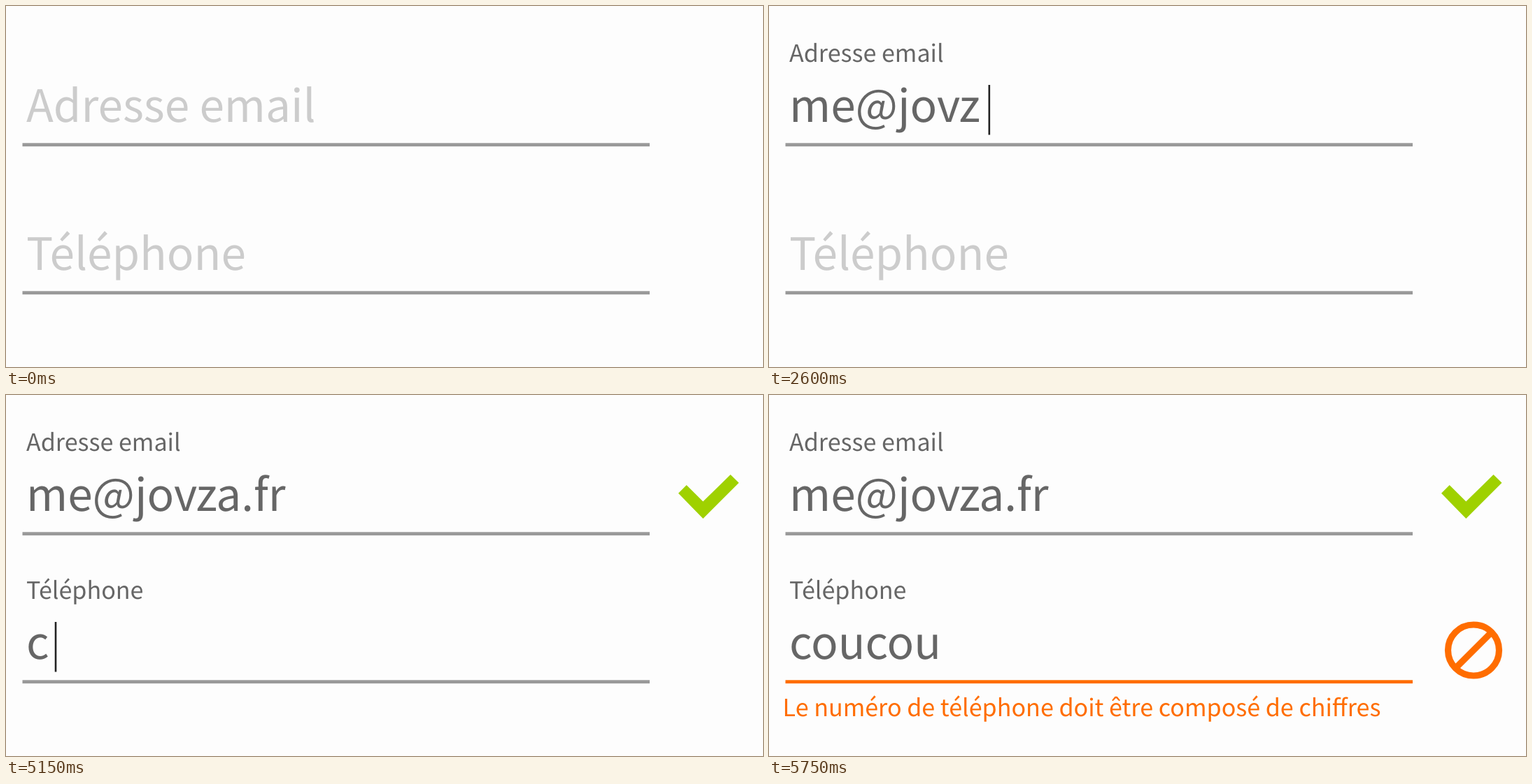
These frames come from a looping animation (1082x517 px, 8.5 s). An HTML page:

```html
<!DOCTYPE html>
<html lang="fr">
<head>
<meta charset="utf-8">
<title>Validation de formulaire</title>
<style>
  html, body { margin: 0; width: 100%; height: 100%; overflow: hidden; background: #fdfdfd; }
  svg { display: block; width: 1082px; height: 517px; }
  text {
    font-family: "Noto Sans CJK JP", "Noto Sans CJK SC", "Noto Sans CJK", "Open Sans", sans-serif;
    font-kerning: normal;
    text-rendering: geometricPrecision;
    fill: #666;
  }
  .large { font-size: 63.9px; }
  .small { font-size: 34.1px; }
  .placeholder { fill: #ccc; }
</style>
</head>
<body>
<svg id="stage" viewBox="0 0 1082 517"></svg>
<script>
const LOOP = 8500, KEY_DELAY = 150;
const GREY = '#999', ORANGE = '#ff6d00', GREEN = '#9fd100';
const stage = document.getElementById('stage');

function add(parent, tag, attrs, content = '') {
  const node = document.createElementNS('http://www.w3.org/2000/svg', tag);
  for (const name in attrs) node.setAttribute(name, attrs[name]);
  node.textContent = content;
  parent.appendChild(node);
  return node;
}

function show(node, visible) {
  node.setAttribute('visibility', visible ? 'visible' : 'hidden');
}

// keys: number of typed characters and caret position after each key press
function createField({ y, label, value, start, keys }) {
  const g = add(stage, 'g', { transform: `translate(0 ${y})` });
  const placeholder = add(g, 'text', { x: 29, y: 166.3, class: 'large placeholder' }, label);
  const caption = add(g, 'text', { x: 29, y: 80.3, class: 'small' }, label);
  const typed = add(g, 'text', { x: 29, y: 166.3, class: 'large' });
  const caret = add(g, 'rect', { y: 113, width: 2.6, height: 71.5, fill: '#222' });
  const line = add(g, 'rect', { x: 23.5, y: 196.3, width: 896.5, height: 4.8, fill: GREY });
  const end = start + keys.length * KEY_DELAY;

  return {
    line, end,
    update(t) {
      const active = t >= start;
      const key = t < end ? keys[Math.floor((t - start) / KEY_DELAY)] : null;
      show(placeholder, !active);
      show(caption, active);
      show(caret, active && key);
      typed.textContent = active ? value.slice(0, key ? key[0] : value.length) : '';
      if (key) caret.setAttribute('x', key[1] - 1.3);
    }
  };
}

const email = createField({
  y: 0, label: 'Adresse email', value: 'me@jovza.fr', start: 2000,
  keys: [[1, 97.2], [3, 194.3], [4, 211.3], [6, 283.3], [7, 314.8], [9, 368.3], [10, 390.3]]
});
const phone = createField({
  y: 212, label: 'Téléphone', value: 'coucou', start: 5150,
  keys: [[1, 71], [2, 108.3], [4, 179.3], [5, 216.4]]
});

const check = add(stage, 'path', {
  d: 'M961 140.7 972.7 129 996.3 152.6 1035.5 114 1047.5 125.8 996.3 177Z', fill: GREEN
});
const error = add(stage, 'g', {});
add(error, 'path', {
  d: 'M970.5 365.5a36.5 36.5 0 1 0 73 0a36.5 36.5 0 1 0 -73 0M981.5 391 1032.5 340',
  fill: 'none', stroke: ORANGE, 'stroke-width': 9.2
});
add(error, 'text', { x: 19.6, y: 460.3, class: 'small', style: `fill:${ORANGE}` },
  'Le numéro de téléphone doit être composé de chiffres');

function render(t) {
  email.update(t);
  phone.update(t);
  const invalid = t >= phone.end;
  show(check, t >= email.end);
  show(error, invalid);
  phone.line.setAttribute('fill', invalid ? ORANGE : GREY);
}

const origin = performance.now();
function tick() {
  render((performance.now() - origin) % LOOP);
  requestAnimationFrame(tick);
}
tick();
</script>
</body>
</html>
```
